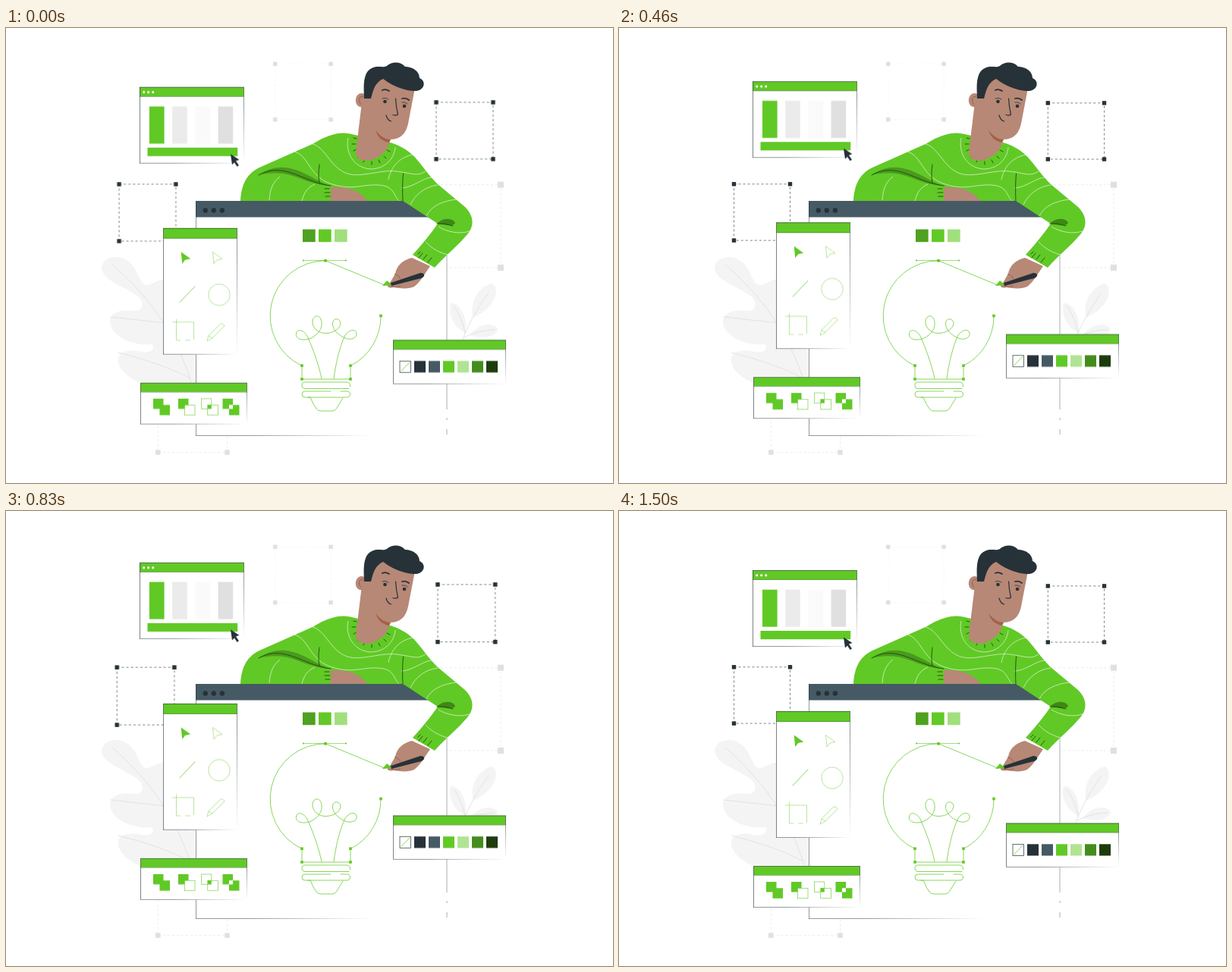
Recreate the animation shown at these times as an HTML page. Size 800 px wide and 600 px high, loop 1540 ms.

```html
<!DOCTYPE html>
<html lang="en">
<head>
<meta charset="utf-8">
<title>Designer at work</title>
<style>
html, body { margin: 0; width: 100%; height: 100%; overflow: hidden; background: #fff; }
svg { display: block; width: 100vw; height: 100vh; }
.green { fill: #61c926; }
.dark { fill: #263238; }
.skin { fill: #b78876; }
.line { fill: none; stroke: #61c926; stroke-width: .75; stroke-linecap: round; stroke-linejoin: round; }
.thin { fill: none; stroke: #61c926; stroke-width: .45; }
.ink { fill: none; stroke: #263238; stroke-width: 1.2; stroke-linecap: round; stroke-linejoin: round; }
.knit { fill: none; stroke: #fff; stroke-width: .7; opacity: .85; }
.seam { fill: none; stroke: #1f4a0f; stroke-width: .9; stroke-linecap: round; }
.vein { fill: none; stroke: #e0e0e0; stroke-width: .9; }
#floaters { animation: float 1540ms -5ms infinite; }
#frames { transform-origin: 395.5px 189.5px; animation: beat 1540ms -5ms infinite; }
/* 37 steps per loop, each 2.7027% long */
@keyframes float {
  0% { transform: translateY(-.3px); animation-timing-function: steps(17); }
  45.946% { transform: translateY(-11.84px); animation-timing-function: steps(1); }
  48.649% { transform: translateY(-11.46px); animation-timing-function: steps(17); }
  94.595% { transform: translateY(-.13px); animation-timing-function: steps(1); }
  97.297%, 100% { transform: none; animation-timing-function: steps(1); }
}
@keyframes beat {
  0% { transform: scale(1.01); animation-timing-function: steps(3); }
  8.108% { transform: scale(1.093); animation-timing-function: steps(1); }
  10.811% { transform: scale(1.083); animation-timing-function: steps(6); }
  27.027%, 35.135% { transform: scale(1); animation-timing-function: steps(1); }
  37.838% { transform: scale(1.0102); animation-timing-function: steps(3); }
  45.946% { transform: scale(1.093); animation-timing-function: steps(1); }
  48.649% { transform: scale(1.077); animation-timing-function: steps(2); }
  54.054% { transform: scale(1.0215); animation-timing-function: steps(1); }
  56.757%, 100% { transform: scale(1); animation-timing-function: steps(1); }
}
</style>
</head>
<body>
<svg viewBox="0 0 800 600">
  <defs>
    <linearGradient id="fadeX"><stop offset=".3" stop-color="#263238"/><stop offset="1" stop-color="#263238" stop-opacity="0"/></linearGradient>
    <linearGradient id="fadeY" x2="0" y2="1"><stop offset=".2" stop-color="#263238"/><stop offset="1" stop-color="#263238" stop-opacity="0"/></linearGradient>
  </defs>

  <g id="ghosts"></g>

  <g fill="#f4f4f4">
    <path d="M126 317C126 304 143 299 155 304C170 311 173 325 178 334C185 347 197 331 207 332L250 380V470H195C180 474 150 457 148 440C146 427 160 423 178 427C191 429 196 424 193 417C170 420 138 408 137 387C137 375 152 371 165 373C181 375 184 363 174 354C158 341 128 334 126 317Z"/>
    <path d="M616 382C610 362 623 341 640 337C651 341 648 367 616 382Z"/>
    <path d="M606 402C589 395 582 375 586 363C598 362 608 380 606 402Z"/>
    <path d="M611 405C621 391 641 386 648 397C646 409 625 410 611 405Z"/>
  </g>
  <path class="vein" d="M140 312C184 350 224 400 245 470M138 381L210 389M148 428C180 436 215 447 243 462"/>
  <path class="vein" d="M601 414C608 392 621 370 636 349M605 403C603 390 597 376 590 367M604 408C616 402 630 398 644 398"/>

  <!-- drawing window -->
  <path d="M250 228H581V537H250Z" fill="#fff"/>
  <path d="M250 228H560V249.500H250Z" fill="#455a64"/>
  <path d="M250.500 228V537.500" stroke="#263238" stroke-width=".5"/>
  <rect x="250" y="537.200" width="232" height=".5" fill="url(#fadeX)"/>
  <path d="M581 290V503M581 514V517M581 529V536" stroke="#263238" stroke-width=".5" opacity=".8"/>
  <g class="dark"><circle cx="262.800" cy="240.500" r="3.200"/><circle cx="273.800" cy="240.500" r="3.200"/><circle cx="284.900" cy="240.500" r="3.200"/></g>
  <path d="M391 265.500h16.700v16.700h-16.700z" fill="#4fa120"/>
  <path class="green" d="M412 265.500h16.700v16.700H412z"/>
  <path d="M433 265.500h16.700v16.700H433z" fill="#a1df7d"/>

  <!-- bulb -->
  <g class="line">
    <path d="M421 306.800A72.800 72.800 0 0 0 390 445.500V463H454V445.500A73 73 0 0 0 494 380"/>
    <path d="M421 306.800L499 339"/>
    <path d="M392 306.500H448" stroke-width=".6"/>
    <path d="M416 462C411 440 404 422 397 406C392 398 384 396 382.500 403C381 411 393 413 402 409C412 404 417 396 416 388C415 377 405 378 404 386C403 396 412 402.500 421 402.500C432 402.500 441 396 441 389C440 382 431 382 430.500 389C430 398 438 405 447 409C455 412 463 409 462 402C460 396 452 398 447 405C440 420 435 440 432 462"/>
    <path d="M452 475.500H394Q390 475.500 390 471.200T394 467H449Q454 467 453.500 473"/>
    <path d="M428 479H394Q390 479 390 483T394 487H449Q453.500 487 453.500 483T449 479H441M398 487H401Q405 497 409 502Q411 505 415 505H430Q434 505 436 501L444 488"/>
  </g>
  <g id="nodes" class="green"></g>

  <!-- man -->
  <path class="green" d="M309 228C310 210 315 193 334 184L405 152.500C420 143 433 138.500 446 138.500Q454 139 460 141L506 151C520 155 533 163 542 174C552 186 558 195 569 206L605 236C617 248 617 261 609 271C596 287 580 299 565 316L536 299Q556 277 569 258L523 228Z"/>
  <path class="skin" d="M428 210C448 208 467 214 476 228H428Z"/>
  <path d="M333 194C350 182 366 181 385 188C402 195 414 204 428 208C410 207 397 202 384 197C366 190 350 190 333 194Z" fill="#4a9a1d"/>
  <path d="M568 258C574 251 588 249 592 257C590 263 577 259 568 258Z" fill="#3f8718"/>
  <g class="knit">
    <path d="M404 153C420 157 426 180 445 190S492 186 515 189S541 196 553 189"/>
    <path d="M380 163C399 168 399 195 427 205S468 206 490 207S510 220 518 228"/>
    <path d="M347 227C348 212 352 203 361 196M390 228C393 216 398 210 407 206"/>
    <path d="M504 200C507 184 518 170 537 167M521 211C535 211 551 197 561 197"/>
    <path d="M533 233C539 220 552 209 569 207M554 248C560 235 575 228 594 226M570 262C581 269 600 273 613 267M553 282C562 292 574 297 582 299"/>
    <path d="M451 145C447 163 457 184 480 186C501 186 512 171 513 157"/>
  </g>
  <g class="seam">
    <path d="M333 194C350 184 366 187 384 194S412 206 428 208"/>
    <path d="M413 180Q411 194 413 204M523.500 192Q522 208 523 228M568 258Q579 257 589 261"/>
    <path d="M420 212h6M420 217h7M421 222h6"/>
    <path d="M458 145l4 1M456 153h5M458 162l4-2M463 171l3-3M471 177l2-4M482 180v-4M493 178l-2-4M501 172l-3-3M506 163l-4-2"/>
    <path d="M544 303l5-6M550 305l5-6M556 309l5-6M543 298l3-3"/>
  </g>
  <path class="skin" d="M469 98L461 164C460 178 487 181 503 158L508 142Z"/>
  <path d="M487 134C493 143 500 147 507 147L505 151C497 150 489 144 487 134Z" fill="#a56047"/>
  <path class="skin" d="M476 72C490 60 530 66 539 79L530 126C527 141 518 147 507 147C497 145 490 140 486 133L470 104C458 106 458 86 469 86C472 86 474 89 475 93Z"/>
  <path d="M471 91C465 88 464 97 468 101" fill="none" stroke="#9a5f49" stroke-width="1"/>
  <path class="dark" d="M472 93C471 74 471 58 482 53C490 49 497 53 502 50C508 44 520 44 526 51C534 51 545 56 545 66C554 70 552 81 541 83C524 83 507 75 497 67C486 72 484 82 481 93Z"/>
  <g class="ink">
    <path d="M513.500 93C514 102 515 108 516.500 114Q514 116 510 114.500"/>
    <path d="M501 115Q503 122 507.500 123"/>
    <path d="M496 82Q500 80 505 83M522 93Q527 91.500 531 95" stroke-width="1.800"/>
    <path d="M496 93Q500 91 504 94M522 98Q526 97 529 100" stroke-width=".8"/>
  </g>
  <circle class="dark" cx="499.500" cy="97" r="2.300"/><circle class="dark" cx="525" cy="103" r="2.300"/>
  <path class="skin" d="M535 303C523 306 515 313 513 324L506 336C500 340 503 344 511 342C522 344 532 344 538 341C547 334 552 324 559 314Z"/>
  <path class="green" d="M496 340L502 333L509 339Z"/>
  <path class="dark" d="M507 336L546 323Q552 323 551 327Q549 330 543 331L508 340Z"/>
  <path d="M512 324Q518 326 521 332M507 340Q514 343 520 340" fill="none" stroke="#8f5a46" stroke-width=".8"/>

  <g id="frames"></g>
  <g id="floaters"></g>
</svg>
<script>
const put = (id, ...parts) => document.getElementById(id).innerHTML = parts.join('');
const rect = (x, y, w, h, attrs) => `<rect x="${x}" y="${y}" width="${w}" height="${h}" ${attrs}/>`;
const path = (d, attrs) => `<path d="${d}" ${attrs}/>`;
const fill = c => `fill="${c}"`;
const green = 'class="green"', dark = 'class="dark"', line = 'class="line"', thin = 'class="thin"';
const dot = (x, y, s, attrs) => rect(x - s / 2, y - s / 2, s, s, attrs);

// Dashed selection frame with corner handles
const frame = (x, y, w, h, size, color, dash = color) =>
  rect(x, y, w, h, `fill="none" stroke="${dash}" stroke-width=".6" stroke-dasharray="3 3"`) +
  [[x, y], [x + w, y], [x, y + h], [x + w, y + h]].map(([a, b]) => dot(a, b, size, fill(color))).join('');

// Panel with a green bar and outlines that fade out
const panel = (x, y, w, h, bar) =>
  rect(x, y, w, h, fill('#fff')) +
  rect(x, y, w, bar, green) +
  rect(x, y, w, .6, dark) +
  rect(x, y + bar - .3, w, .3, dark) +
  rect(x, y, .6, h, dark) +
  rect(x + w - .5, y, .5, h, fill('url(#fadeY)')) +
  rect(x, y + h - .5, w, .5, fill('url(#fadeX)'));

put('ghosts',
  frame(354.7, 47.3, 73.4, 73.4, 5.5, '#e0e0e0', '#f0f0f0'),
  frame(543, 206.7, 109, 109.3, 8, '#e0e0e0'),
  frame(200.3, 468, 91.2, 91.6, 6.5, '#e0e0e0'));

put('frames',
  frame(151.5, 205.8, 74, 74.3, 5.4, '#263238'),
  frame(565.3, 98.9, 74.2, 74.1, 5.4, '#263238'));

put('nodes',
  [[421, 306.8], [494, 379.5], [390, 445.2], [454, 445.2], [390, 463], [454, 463]].map(([x, y]) => dot(x, y, 3.6, '')).join(''),
  dot(392, 306.5, 1.8, ''), dot(448, 306.5, 1.8, ''));

const chart = panel(176, 78.3, 137.7, 100.4, 12.5) +
  [181.7, 187.7, 193.7].map(x => `<circle cx="${x}" cy="84.800" r="1.600" fill="#fff"/>`).join('') +
  ['#61c926', '#ebebeb', '#fafafa', '#e0e0e0'].map((c, i) => rect(189 + i * 30.2, 103.7, 19.6, 49, fill(c))).join('') +
  rect(186.5, 158, 118.7, 11.2, green) +
  path('M296 166.500L307.500 174L303 175.500L307 181.500L304.500 183L301 177.500L298 180.500Z', dark);

const arrow = 'l12.500 9l-7 1.500l-4 5z';
const tools = panel(207.4, 264, 97.3, 166.8, 14) +
  path('M230.700 295.600' + arrow, green) +
  path('M272.500 295.600' + arrow, thin) +
  path('M229 362L249 341', line) +
  `<circle cx="281" cy="352" r="14.200" ${thin}/>` +
  path('M219 388H247.500V411M224.500 384V412H230M236 412H243', thin) +
  path('M265 413L267 406L282.500 390.500Q286 388.500 288 393L272 409ZM267 406L272 409', thin);

// Overlapping pair of squares: fills of back, front and shared part
const pair = (x, back, front, shared) => {
  const look = solid => solid ? green : 'fill="#fff" stroke="#61c926" stroke-width=".6"';
  return rect(x, 489, 13.5, 13.5, look(back)) + rect(x + 8.5, 497.3, 13.5, 13.5, look(front)) +
    (shared === undefined ? '' : rect(x + 8.5, 497.3, 5, 5.2, shared ? green : fill('#fff')));
};
const shapes = panel(177.4, 468.3, 140.3, 54.5, 12) +
  pair(194, 1, 1) + pair(227, 1, 0) + pair(257.3, 0, 0, 1) + pair(285.5, 1, 1, 0);

const palette = panel(510.3, 411.7, 148.5, 57.8, 12.5) +
  rect(519, 439.6, 14.5, 14.8, 'fill="#fff" stroke="#263238" stroke-width=".7"') +
  path('M520.500 453L532 441', line) +
  ['#263238', '#455a64', '#61c926', '#b0e493', '#448d1b', '#1d3c0b']
    .map((c, i) => rect(538 + i * 19, 439.3, 15, 15.2, fill(c))).join('');

put('floaters', chart, tools, shapes, palette);
</script>
</body>
</html>
```
